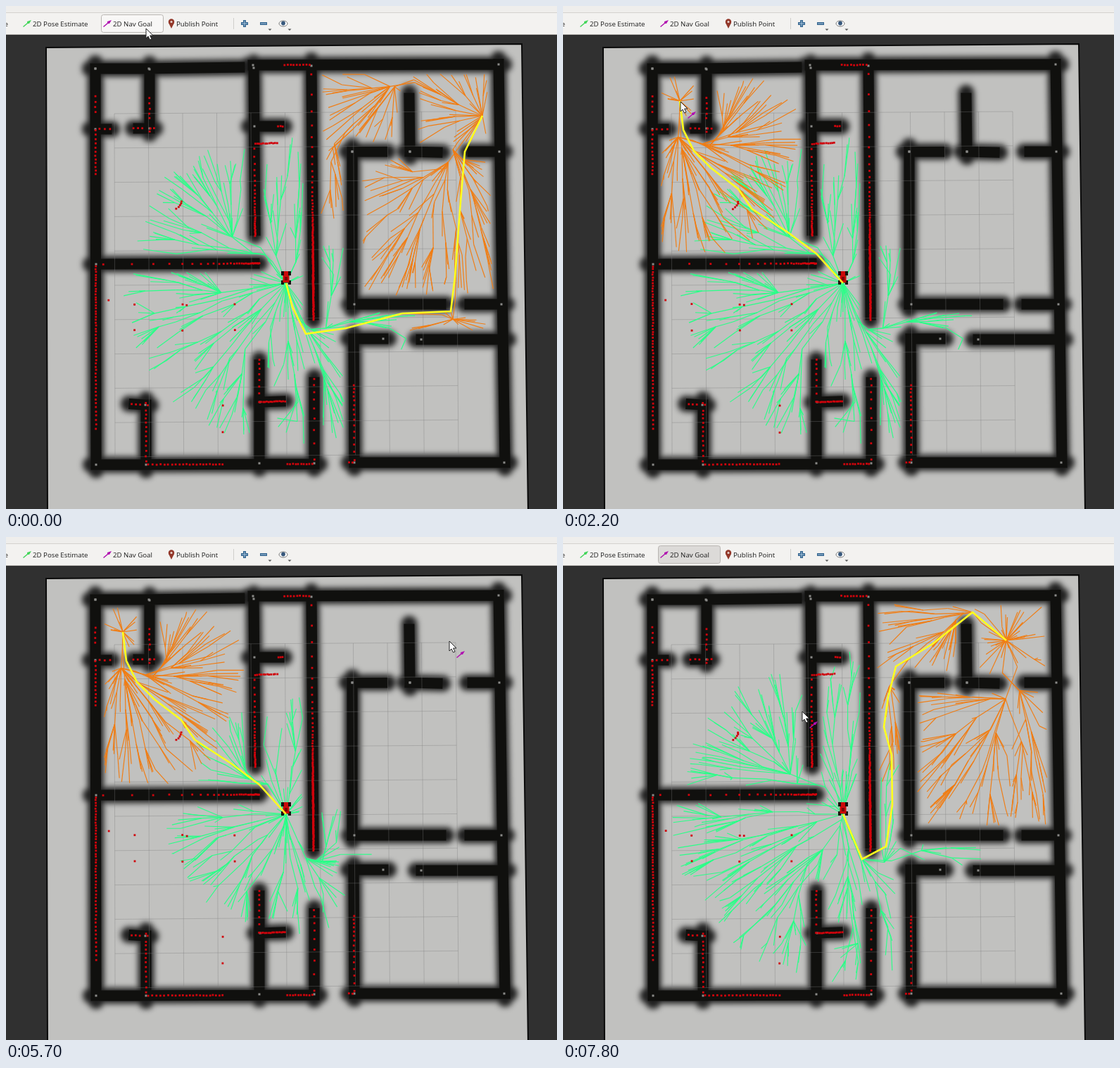
An HTML page with a canvas that plays this animation: 783x715 px, repeating every 8000 ms.

```html
<!DOCTYPE html>
<html lang="en">
<head>
<meta charset="utf-8">
<title>Path planning</title>
<style>
html, body { margin: 0; width: 100%; height: 100%; overflow: hidden; background: #303030; }
canvas { display: block; }
</style>
</head>
<body>
<canvas id="stage" width="783" height="715"></canvas>
<script>
const W = 783, H = 715, LOOP = 8000, STEP = 100;
const ctx = document.getElementById('stage').getContext('2d');

function layer(paint) {
  const c = document.createElement('canvas');
  c.width = W;
  c.height = H;
  paint(c.getContext('2d'));
  return c;
}

function random(seed) {
  return () => (seed = (Math.imul(seed, 1664525) + 1013904223) >>> 0) / 2 ** 32;
}

function polyline(points, close) {
  const p = new Path2D();
  points.forEach(([x, y]) => p.lineTo(x, y));
  if (close) p.closePath();
  return p;
}

function segment(g, x1, y1, x2, y2) {
  g.beginPath();
  g.moveTo(x1, y1);
  g.lineTo(x2, y2);
  g.stroke();
}

const mix = (a, b, k) => a + (b - a) * k;
const within = (q, spans) => spans.some(([a, b]) => q >= a && q < b);

// Floor plan: centre lines from a marked joint to the other end
const HALF = 7.5;
const WALLS = [
  [127, 89, 128, 652], [203, 89, 332, 87], [127, 89, 203, 89], [351, 84, 700, 83],
  [700, 83, 709, 649], [128, 652, 438, 651], [708, 649, 495, 649],
  [204, 90, 204, 174], [204, 174, 188, 174], [127, 175, 143, 175],
  [352, 88, 354, 319], [353, 171, 388, 171], [434, 85, 437, 439],
  [128, 367, 353, 366], [492, 207, 492, 424], [495, 649, 494, 473],
  [492, 207, 535, 207], [574, 207, 573, 131], [574, 207, 613, 208],
  [701, 207, 663, 207], [495, 424, 618, 424], [704, 424, 659, 424],
  [536, 473, 494, 473], [590, 474, 706, 474], [198, 567, 182, 566],
  [199, 652, 199, 567], [360, 650, 360, 510], [361, 563, 390, 562], [438, 650, 438, 535]
];

function strokeWalls(g, width, color, blur = 0) {
  g.filter = blur ? `blur(${blur}px)` : 'none';
  g.strokeStyle = color;
  g.lineWidth = width;
  g.beginPath();
  for (const [x1, y1, x2, y2] of WALLS) {
    // every wall runs half its thickness past both ends
    const k = HALF / Math.hypot(x2 - x1, y2 - y1);
    g.moveTo(mix(x1, x2, -k), mix(y1, y2, -k));
    g.lineTo(mix(x1, x2, 1 + k), mix(y1, y2, 1 + k));
  }
  g.stroke();
  g.filter = 'none';
}

const map = layer(g => {
  g.fillStyle = '#303030';
  g.fillRect(0, 0, W, H);
  const sheet = polyline([[57, 59], [733, 54], [742, 720], [59, 720]], true);
  g.fillStyle = '#c1c1bf';
  g.fill(sheet);
  g.lineCap = 'round';
  strokeWalls(g, 30, 'rgba(0,0,0,.16)', 3);
  strokeWalls(g, 21, 'rgba(0,0,0,.8)', 3.5);
  g.lineCap = 'butt';
  strokeWalls(g, 2 * HALF, '#10100e', 0.6);
  g.strokeStyle = '#0a0a0a';
  g.lineWidth = 2;
  g.stroke(sheet);

  g.strokeStyle = 'rgba(125,125,125,.45)';
  g.lineWidth = 0.8;
  for (let k = 0; k < 1.01; k += 0.1) {
    segment(g, mix(154, 639, k), mix(153, 150, k), mix(155, 643, k), mix(641, 637, k));
    segment(g, mix(154, 155, k), mix(153, 641, k), mix(639, 643, k), mix(150, 637, k));
  }
  g.fillStyle = '#8a8a88';
  for (const [x, y] of WALLS) g.fillRect(x - 1.5, y - 1.5, 3, 3);
});

// Laser scan: rays at equal angles from the robot to the nearest wall
const LASER = [398, 386], RAYS = 430;
const CABINET = [357, 196, 378, 195];

function castRay(angle) {
  const [ox, oy] = LASER, dx = Math.cos(angle), dy = Math.sin(angle);
  let range = Infinity;
  for (const [x1, y1, x2, y2] of [...WALLS, CABINET]) {
    const ex = x2 - x1, ey = y2 - y1, det = dx * ey - dy * ex;
    const r = ((x1 - ox) * ey - (y1 - oy) * ex) / det;
    const u = ((x1 - ox) * dy - (y1 - oy) * dx) / det;
    const over = HALF / Math.hypot(ex, ey);
    if (r > 0 && u > -over && u < 1 + over) range = Math.min(range, r);
  }
  return [ox + dx * range, oy + dy * range];
}

const hits = [[146, 418], [257, 425], [308, 568], [308, 606]];
for (const x of [183, 251, 325]) hits.push([x, 424], [x, 461]);
for (let i = 0; i < 5; i++) hits.push([249 - i * i * 0.45, 278 + i * 2.6]);
for (let i = 0; i < RAYS; i++) hits.push(castRay(i / RAYS * 2 * Math.PI));

function drawHits(q) {
  const rand = random(q * 7919 + 5);
  const noise = () => (rand() - 0.5) * 0.9;
  ctx.fillStyle = '#d0040c';
  for (const [x, y] of hits) ctx.fillRect(x - 1.4 + noise(), y - 1.4 + noise(), 2.8, 2.8);
}

// Search trees: shortest links between random free points, up to a given cost
const LINK = 50, AREA_PER_POINT = 215;

const blocked = layer(g => {
  g.lineCap = 'round';
  strokeWalls(g, 24, '#000');
}).getContext('2d').getImageData(0, 0, W, H).data;

const isFree = (x, y) => !blocked[(Math.round(y) * W + Math.round(x)) * 4 + 3];

function isClear(a, b, length) {
  const n = Math.ceil(length / 5);
  for (let i = 1; i <= n; i++) if (!isFree(mix(a.x, b.x, i / n), mix(a.y, b.y, i / n))) return false;
  return true;
}

function growTree(color, route, budget, seed) {
  const rand = random(seed);
  const [rx, ry] = route[0];
  const open = route.map(([x, y]) => ({ x, y, cost: Infinity }));
  open[0].cost = 0;
  for (let i = 0; i < 575 * 565 / AREA_PER_POINT; i++) {
    const x = mix(130, 705, rand()), y = mix(87, 652, rand());
    if (Math.hypot(x - rx, y - ry) < budget && isFree(x, y)) open.push({ x, y, cost: Infinity });
  }
  return layer(g => {
    g.strokeStyle = color;
    g.lineWidth = 1.15;
    while (open.length) {
      const i = open.reduce((best, p, j) => p.cost < open[best].cost ? j : best, 0);
      const [node] = open.splice(i, 1);
      if (node.cost > budget) break;
      if (node.parent) segment(g, node.parent.x, node.parent.y, node.x, node.y);
      for (const p of open) {
        const d = Math.hypot(p.x - node.x, p.y - node.y);
        if (d < LINK && node.cost + d < p.cost && isClear(node, p, d)) {
          p.cost = node.cost + d;
          p.parent = node;
        }
      }
    }
  });
}

const fromRobot = (route, budget, seed) => growTree('#2aff88', route, budget, seed);
const fromGoal = (route, budget, seed) => growTree('#f07d14', [...route].reverse(), budget, seed);

const east = [[398, 394], [407, 428], [426, 466], [483, 458], [563, 437], [632, 434], [638, 385], [645, 290], [652, 207], [677, 156]];
const west = [[398, 394], [360, 352], [320, 322], [268, 288], [249, 260], [210, 230], [186, 206], [171, 176], [166, 135]];
const north = [[398, 394], [425, 458], [459, 440], [468, 381], [467, 310], [456, 270], [462, 228], [473, 184], [525, 152], [582, 107], [630, 147]];

const greenWide = fromRobot(east, 236, 11);
const orangeWest = fromGoal(west, 236, 53);

const PLANS = [
  { at: 0, route: east, trees: [greenWide, fromGoal(east, 375, 41)] },
  { at: 2200, route: west, trees: [greenWide, orangeWest] },
  { at: 2700, route: west, trees: [fromRobot(west, 174, 23), orangeWest] },
  { at: 5900, route: north, trees: [fromRobot(north, 246, 37), fromGoal(north, 370, 67)] }
];

function drawRobot() {
  ctx.fillStyle = '#16120f';
  for (const x of [391, 401]) for (const y of [377, 390]) ctx.fillRect(x, y, 4, 6);
  ctx.fillRect(393, 379, 10, 1.5);
  ctx.fillRect(393, 392, 10, 1.5);
  ctx.fillStyle = '#cc0a0a';
  ctx.fillRect(395, 377, 6, 8);
  ctx.fillRect(393.5, 383, 9, 10);
  ctx.fillStyle = '#780808';
  ctx.fillRect(396, 385, 4, 5);
}

// Toolbar
function slimArrow(g, x, y, color) {
  g.save();
  g.translate(x, y);
  g.fillStyle = color;
  g.fill(polyline([[0, 9], [6, 4], [6, 2], [12, 0], [9, 5], [7, 5], [1, 10]], true));
  g.restore();
}

function disc(g, x, y, r, color) {
  g.fillStyle = color;
  g.beginPath();
  g.arc(x, y, r, 0, 2 * Math.PI);
  g.fill();
}

function drawToolbar(button) {
  const bar = (y, h, color) => {
    ctx.fillStyle = color;
    ctx.fillRect(0, y, W, h);
  };
  bar(0, 41, '#f3f2f0');
  bar(0, 9, '#efeeec');
  bar(9, 1, '#d3d1ce');
  bar(40, 1, '#b9b7b3');
  ctx.fillStyle = '#d0cecb';
  ctx.fillRect(323, 17, 1, 16);
  ctx.lineWidth = 1;
  if (button) {
    ctx.beginPath();
    ctx.roundRect(135.5, 12.5, 88, 25, 3);
    ctx.fillStyle = button === 'down' ? '#dcdad8' : '#f8f7f6';
    ctx.fill();
    ctx.strokeStyle = '#b8b5b1';
    ctx.stroke();
  }
  slimArrow(ctx, 24, 20, '#45d65c');
  slimArrow(ctx, 138, 20, '#b010b0');

  disc(ctx, 235, 22.5, 4.2, '#93382a');
  ctx.fill(polyline([[231, 24], [239, 24], [235, 32]], true));
  disc(ctx, 235, 22.5, 1.5, '#e9d5cf');

  ctx.font = '9.7px "Open Sans", "Noto Sans", sans-serif';
  ctx.fillStyle = '#1c1c1c';
  const labels = { 'e': -2.5, '2D Pose Estimate': 38, '2D Nav Goal': 152, 'Publish Point': 242 };
  for (const text in labels) ctx.fillText(text, labels[text], 28.5);

  ctx.fillStyle = '#34658f';
  ctx.fillRect(334, 23, 10, 4);
  ctx.fillRect(337, 20, 4, 10);
  ctx.fillRect(361, 23, 10, 4);
  ctx.fillStyle = '#a9c6de';
  ctx.fillRect(335, 24.5, 8, 1);
  ctx.fillRect(338.5, 21, 1, 8);
  ctx.fillRect(362, 24.5, 8, 1);

  ctx.strokeStyle = '#777';
  ctx.fillStyle = '#fff';
  ctx.beginPath();
  ctx.ellipse(394, 25, 6, 4, 0, 0, 2 * Math.PI);
  ctx.fill();
  ctx.stroke();
  disc(ctx, 394, 24.5, 2.9, '#38587c');
  ctx.fillStyle = '#555';
  for (const x of [375, 403]) ctx.fill(polyline([[x - 2.5, 32.5], [x + 2.5, 32.5], [x, 35]], true));
}

function buttonAt(q) {
  if (within(q, [[200, 2000], [4200, 5400], [7600, LOOP]])) return 'down';
  return within(q, [[0, 200], [4000, 4200], [7300, 7600]]) ? 'hover' : '';
}

// Pointer: time, x, y
const POINTER = [
  [0, 199, 32], [500, 199, 32], [1600, 170, 142], [2000, 167, 136], [2600, 167, 136],
  [3100, 613, 80], [3600, 358, 115], [4100, 190, 29], [4400, 190, 29], [5300, 630, 148],
  [6600, 630, 148], [6900, 548, 152], [7300, 185, 22], [7700, 185, 22], [7800, 340, 248], [LOOP, 340, 248]
];

function pointerAt(q) {
  const i = POINTER.findIndex(p => p[0] > q);
  const [t1, x1, y1] = POINTER[i - 1], [t2, x2, y2] = POINTER[i];
  const k = (q - t1) / (t2 - t1);
  return [mix(x1, x2, k), mix(y1, y2, k)];
}

function moveIcon() {
  for (let i = 0; i < 4; i++) {
    ctx.save();
    ctx.translate(16, 19);
    ctx.rotate(i * Math.PI / 2);
    const arm = polyline([[-0.6, 0], [-0.6, -4], [-2.5, -4], [0, -7], [2.5, -4], [0.6, -4], [0.6, 0]], true);
    ctx.strokeStyle = '#f4f4f4';
    ctx.fillStyle = '#444';
    ctx.lineWidth = 1.2;
    ctx.stroke(arm);
    ctx.fill(arm);
    ctx.restore();
  }
}

function drawPointer(q) {
  const [x, y] = pointerAt(q);
  ctx.save();
  ctx.translate(Math.round(x), Math.round(y));
  if (y > 42) {
    if (within(q, [[200, 2700], [4200, 6200], [7600, LOOP]])) slimArrow(ctx, 10, 14, '#b010b0');
    else moveIcon();
  }
  const arrow = polyline([[0, 0], [0, 14], [3, 11], [5.5, 16], [8, 15], [5.6, 10], [10, 10]], true);
  ctx.fillStyle = '#fff';
  ctx.strokeStyle = '#222';
  ctx.lineWidth = 1;
  ctx.fill(arrow);
  ctx.stroke(arrow);
  ctx.restore();
}

function draw(q) {
  const plan = PLANS.filter(p => p.at <= q).pop();
  ctx.drawImage(map, 0, 0);
  plan.trees.forEach(t => ctx.drawImage(t, 0, 0));
  drawHits(q);
  drawRobot();
  ctx.strokeStyle = '#ffff1e';
  ctx.lineWidth = 2.6;
  ctx.stroke(polyline(plan.route));
  drawToolbar(buttonAt(q));
  drawPointer(q);
}

let shown = -1;
function tick() {
  const q = Math.floor((performance.now() % LOOP) / STEP) * STEP;
  if (q !== shown) draw(shown = q);
  requestAnimationFrame(tick);
}
tick();
</script>
</body>
</html>
```
